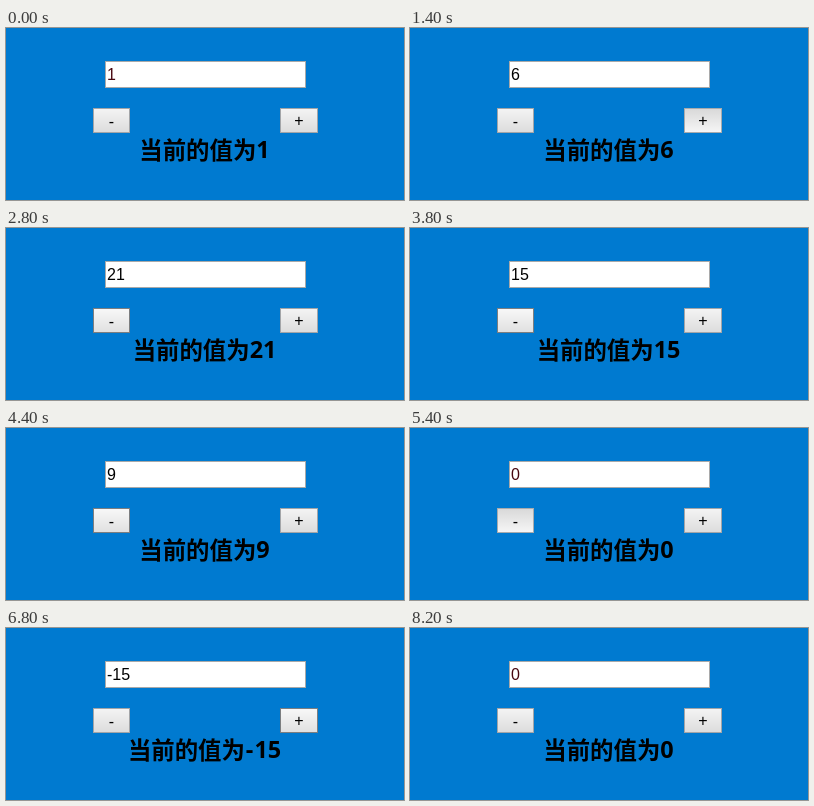
Recreate the animation shown at these times as an HTML page. Size 398 by 172 pixels, loop 9500 ms.

```html
<!DOCTYPE html>
<html lang="zh">
<head>
<meta charset="utf-8">
<title>Counter</title>
<style>
  html, body { margin: 0; width: 100%; height: 100%; overflow: hidden; background: #007ad0; }
  svg { display: block; width: 398px; height: 172px; }
  .ui { font: 16px "Liberation Sans", Arial, sans-serif; }
  .label { font: 700 23.4px "Open Sans", "Noto Sans CJK SC", "Noto Sans CJK", sans-serif; text-anchor: middle; }
  .button text { text-anchor: middle; }
  .button rect { fill: url(#plain); stroke: #a3a5a8; }
  .button.hover rect { fill: url(#lit); stroke: #7c7e80; }
  .button.press rect { fill: url(#pressed); stroke: #a9abad; }
</style>
</head>
<body>
<svg viewBox="0 0 398 172">
  <defs>
    <linearGradient id="plain" x2="0" y2="1">
      <stop offset="0" stop-color="#f4f4f4"/><stop offset="1" stop-color="#dcdcdc"/>
    </linearGradient>
    <linearGradient id="lit" x2="0" y2="1">
      <stop offset="0" stop-color="#f8f8f8"/><stop offset="1" stop-color="#e0e0e0"/>
    </linearGradient>
    <linearGradient id="pressed" x2="0" y2="1">
      <stop offset="0" stop-color="#d8d8d8"/><stop offset="1" stop-color="#f6f6f6"/>
    </linearGradient>
  </defs>
  <rect x="99.5" y="33.5" width="200" height="26" fill="#fff" stroke="#a9a9a9"/>
  <text id="field" class="ui" x="101" y="52"></text>
  <g id="minus" class="button ui">
    <rect x="87.5" y="80.5" width="36" height="24"/>
    <text x="105.5" y="99">-</text>
  </g>
  <g id="plus" class="button ui">
    <rect x="274.5" y="80.5" width="37" height="24"/>
    <text x="293" y="98">+</text>
  </g>
  <text class="label" x="198.5" y="131">当前的值为<tspan dy="-1"><tspan id="sign"></tspan><tspan id="digits"></tspan></tspan></text>
</svg>
<script>
const LOOP = 9500;
const el = id => document.getElementById(id);

// [time, button, state]; "click" releases the button and steps the value
const steps = [
  [0, "plus", ""], [100, "plus", "hover"],
  [600, "plus", "press"], [700, "plus", "click"],
  [1400, "plus", "press"], [1500, "plus", "click"],
  [1800, "plus", "press"], [1900, "plus", "click"],
  [2200, "plus", "press"], [2300, "plus", "click"], [2500, "plus", ""],
  [2800, "minus", "hover"],
  [3100, "minus", "press"], [3200, "minus", "click"],
  [3600, "minus", "press"], [3800, "minus", "click"],
  [4100, "minus", "press"], [4200, "minus", "click"],
  [4300, "minus", "press"], [4400, "minus", "click"],
  [4500, "minus", "press"], [4600, "minus", "click"],
  [4800, "minus", "press"], [4900, "minus", "click"],
  [5000, "minus", "press"], [5200, "minus", "click"],
  [5400, "minus", "press"], [5600, "minus", "click"],
  [5700, "minus", "press"], [5800, "minus", "click"],
  [6000, "minus", "press"], [6100, "minus", "click"],
  [6200, "minus", "press"], [6300, "minus", "click"],
  [6400, "minus", "press"], [6500, "minus", "click"], [6500, "minus", ""],
  [6800, "plus", "hover"],
  [7100, "plus", "press"], [7200, "plus", "click"],
  [7600, "plus", "press"], [7700, "plus", "click"],
  [7800, "plus", "click"], [8200, "plus", ""]
];
const change = { plus: 5, minus: -3 };

function stateAt(time) {
  const now = { value: 1, plus: "", minus: "" };
  for (const [at, button, state] of steps) {
    if (at > time) break;
    if (state === "click") now.value += change[button];
    now[button] = state === "click" ? "hover" : state;
  }
  return now;
}

let shown = "";
function draw(time) {
  const now = stateAt(time);
  const key = JSON.stringify(now);
  if (key === shown) return;
  shown = key;
  const negative = now.value < 0;
  el("field").textContent = now.value;
  el("field").style.fill = Math.abs(now.value) <= 1 ? "#480810" : "#000";
  el("sign").textContent = negative ? "-" : "";
  el("digits").textContent = Math.abs(now.value);
  for (const id of ["sign", "digits"]) el(id).setAttribute("dx", negative ? 1 : 0);
  for (const id of ["plus", "minus"]) el(id).setAttribute("class", "button ui " + now[id]);
}

const start = performance.now();
function tick() {
  draw((performance.now() - start) % LOOP);
  requestAnimationFrame(tick);
}
tick();
</script>
</body>
</html>
```
